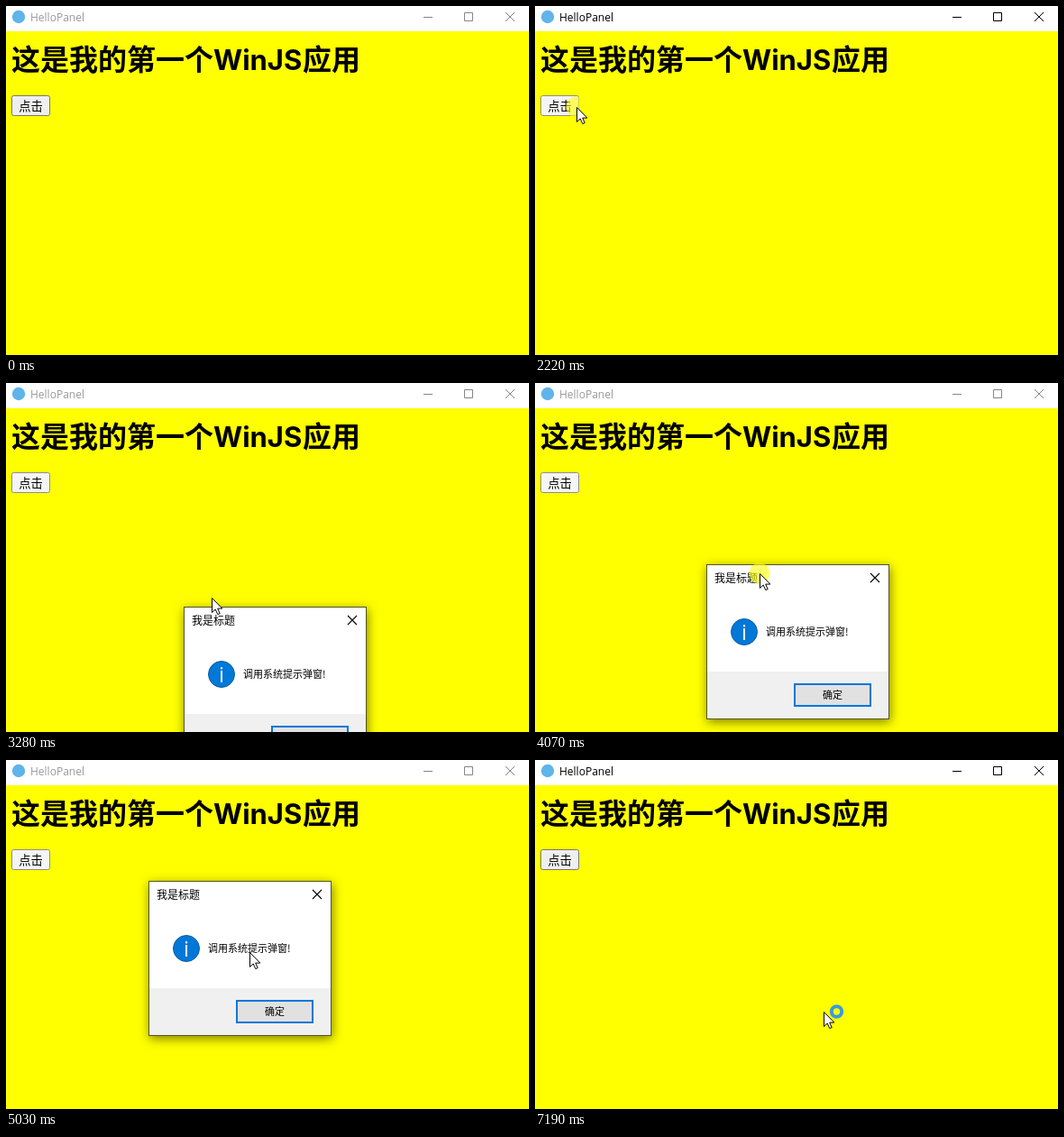
These frames come from a looping animation (580 px wide and 387 px high, 7.26 s). An HTML page:

```html
<!DOCTYPE html>
<html lang="zh">
<head>
<meta charset="utf-8">
<style>
  html, body { margin: 0; width: 100%; height: 100%; overflow: hidden; background: #ff0; }
  svg { display: block; width: 580px; height: 387px; }
  text { font-family: "Open Sans", "Noto Sans CJK SC", "Noto Sans CJK", sans-serif; }
  .cjk { font-family: "Noto Sans CJK SC", "Noto Sans CJK", sans-serif; }
  .head { font-size: 32px; font-weight: 700; }
  .latin { font: 700 31px Inter, sans-serif; }
  .mid { text-anchor: middle; }
  #dialog { filter: drop-shadow(1px 3px 6px rgba(0, 0, 0, .5)); }
</style>
</head>
<body>
<svg viewBox="0 0 580 387">
  <rect width="580" height="387" fill="#ff0"/>
  <rect width="580" height="28" fill="#fff"/>
  <circle cx="14" cy="12" r="7.2" fill="#5fb4ea"/>
  <text id="title" x="27" y="17" font-size="12">HelloPanel</text>
  <path id="controls" fill="none" d="M463 12.5h10M508.5 7.5h9v9h-9zM554 7l10 10m0-10l-10 10"/>

  <text class="cjk head" x="6" y="71">这是我的第一个</text>
  <text class="latin" x="230" y="71">WinJS</text>
  <text class="cjk head" x="329" y="71">应用</text>

  <rect id="button" x="6.5" y="99.5" width="42" height="22" rx="2"/>
  <text class="cjk mid" x="27.5" y="116" font-size="13.33">点击</text>

  <g id="dialog">
    <rect width="203" height="172" fill="#fff"/>
    <rect y="119" width="203" height="53" fill="#f0f0f0"/>
    <rect x=".5" y=".5" width="202" height="171" fill="none" stroke="#55551c"/>
    <text class="cjk" x="9" y="20" font-size="12">我是标题</text>
    <path d="M182 10l10 10m0-10l-10 10" stroke="#000" stroke-width="1.1"/>
    <circle cx="42" cy="75" r="14.5" fill="#0078d7" stroke="#0a5ca8"/>
    <text class="mid" x="42" y="84" font-size="24" fill="#fff">i</text>
    <text class="cjk" x="66" y="79" font-size="11">调用系统提示弹窗!</text>
    <rect x="98" y="133" width="84" height="24" fill="#e1e1e1" stroke="#0078d7" stroke-width="2"/>
    <rect id="hover" x="97.5" y="132.5" width="85" height="25" fill="#e5f1fb" stroke="#0078d7"/>
    <rect id="press" x="97.5" y="132.5" width="85" height="25" fill="#cce4f7" stroke="#005499"/>
    <text class="cjk mid" x="140" y="149" font-size="11">确定</text>
  </g>

  <g id="cursor">
    <circle id="glow" r="11.5" fill="#ff0" opacity=".6"/>
    <path d="M.5.5v16l3.7-3.5 2.6 5.6 2.4-1-2.5-5.5h5.1z" fill="#fff" stroke="#000"/>
    <circle id="busy" cx="14.5" cy="0" r="5.7" fill="none" stroke="#3a9bdc" stroke-width="4"/>
  </g>
</svg>
<script>
const LOOP = 7260, DRAG = [3810, 4750], GRIP = [59, 10];
// time, x, y
const path = [
  [400, 450, 374], [470, 412, 346], [540, 368, 308], [600, 343, 290],
  [740, 343, 290], [800, 343, 300], [1000, 255, 228], [1200, 183, 165],
  [1400, 117, 138], [1470, 103, 132], [1750, 56, 116], [1890, 46, 112],
  [2970, 46, 112], [3030, 70, 132], [3280, 228, 238], [3680, 251, 254],
  [3750, 251, 254], [3810, 256, 258], [4280, 243, 173], [4480, 239, 165],
  [4750, 217, 144], [4820, 217, 144], [5030, 270, 213], [5240, 320, 278],
  [5300, 320, 279]
];
const $ = id => document.getElementById(id);
const set = (id, attrs) => {
  for (const k in attrs) $(id).setAttribute(k, attrs[k]);
};
const ramp = (t, a, b) => Math.min(1, Math.max(0, (t - a) / (b - a)));
const within = (t, a, b) => t >= a && t < b;
const show = on => on ? 'inline' : 'none';

function pointer(t) {
  const i = path.findIndex(p => p[0] > t);
  if (i < 0) return path[path.length - 1].slice(1);
  if (!i) return path[0].slice(1);
  const [a, x, y] = path[i - 1], [b, u, v] = path[i], k = ramp(t, a, b);
  return [x + (u - x) * k, y + (v - y) * k];
}

function draw(t) {
  const active = within(t, 2090, 2290) || t >= 6990;
  set('title', { fill: active ? '#000' : '#999' });
  set('controls', { stroke: active ? '#000' : '#858585' });

  const [fill, stroke] =
    within(t, 1790, 2090) ? ['#e5e5e5', '#4f4f4f'] :
    within(t, 2090, 6990) ? ['#f5f5f5', '#8d8d8d'] : ['#efefef', '#767676'];
  set('button', { fill, stroke });

  const [x, y] = pointer(t).map(Math.round);
  set('cursor', { transform: `translate(${x} ${y})`, display: show(t >= 400) });
  set('busy', { display: show(t >= 6990) });
  set('glow', {
    display: show(within(t, 2090, 2230) || within(t, DRAG[0], DRAG[1] + 70) || within(t, 6120, 6990))
  });

  const opened = 1 - (1 - ramp(t, 2290, 2540)) ** 2;
  const seen = opened * (1 - ramp(t, 6960, 7180));
  const [dx, dy] = pointer(Math.min(DRAG[1], Math.max(DRAG[0], t)))
    .map((v, i) => Math.round(v) - GRIP[i]);
  set('dialog', {
    display: show(seen > 0),
    opacity: seen,
    transform: `translate(${dx + 101.5} ${dy + 86}) scale(${.93 + .07 * seen}) translate(-101.5 -86)`
  });
  set('hover', { opacity: ramp(t, 5270, 5510) });
  set('press', { opacity: ramp(t, 6090, 6330) });
}

const start = performance.now();
function tick() {
  draw((performance.now() - start) % LOOP);
  requestAnimationFrame(tick);
}
tick();
</script>
</body>
</html>
```
